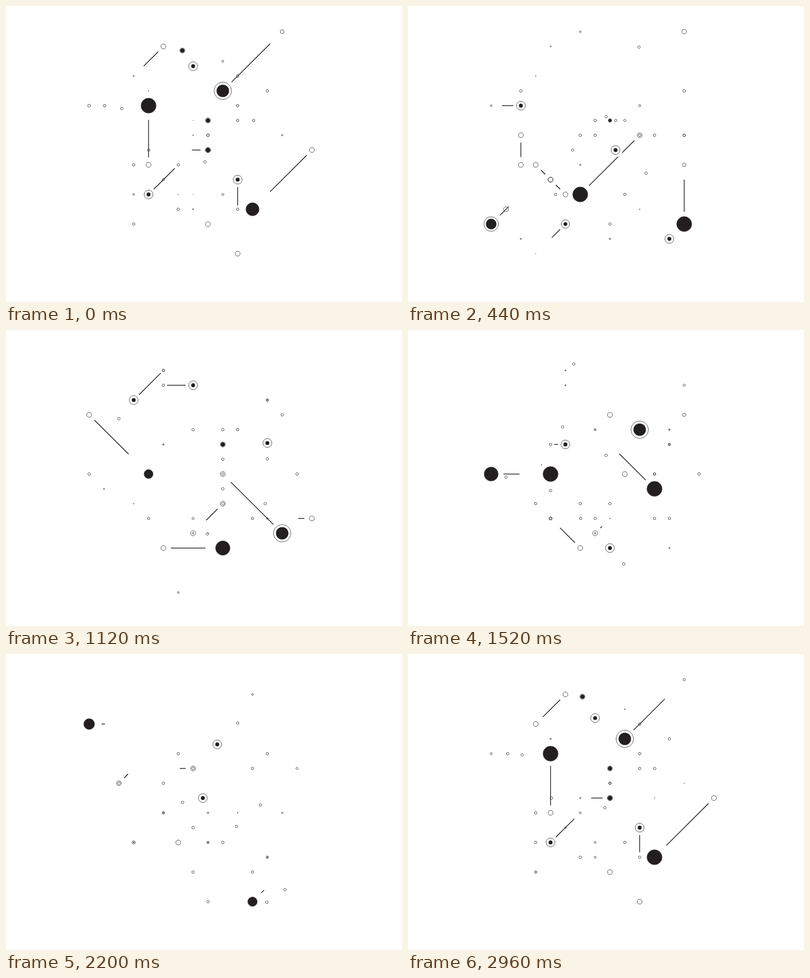
An HTML page with a canvas that plays this animation: 800x600 px, repeating every 3000 ms.

```html
<!DOCTYPE html>
<html lang="en">
<head>
<meta charset="utf-8">
<title>Grid constellation</title>
<style>
  html, body { margin: 0; width: 100%; height: 100%; overflow: hidden; background: #fff; }
  canvas { display: block; }
</style>
</head>
<body>
<canvas id="stage" width="800" height="600"></canvas>
<script>
const ctx = document.getElementById('stage').getContext('2d');
const LOOP = 3000, STEP = 40, COLS = 16, ROWS = 17, CELL = 30, INK = '#231f20';
const TRAVEL = 320, WALK = 400, DOTS = 128;
const RADIUS = { dot: 2.6, hoop: 5, spot: 5.6, eye: 9, disc: 15.6, target: 17.5 };
const GAP = { dot: 7.5, hoop: 15, eye: 15, disc: 25, target: 25 };

const clamp = v => Math.min(1, Math.max(0, v));
const ease = u => (1 - Math.cos(Math.PI * clamp(u))) / 2;
const wrap = (t, n) => ((t % n) + n) % n;
const since = (t, start) => wrap(t - start + 1000, LOOP) - 1000;
const px = col => 168 + CELL * col;
const py = row => 52 + CELL * row;

function random(seed) {
  return () => {
    seed = (seed * 1664525 + 1013904223) >>> 0;
    return seed / 4294967296;
  };
}

// A line leaves one node and arrives at another: start time, from, to
const links = [
  [18, 'hoop', 0, 5, 'eye', 2, 5],
  [120, 'disc', 6, 11, 'hoop', 10, 7],
  [130, 'hoop', 3, 9, 'hoop', 4, 10],
  [130, 'hoop', 4, 10, 'hoop', 5, 11],
  [152, 'hoop', 2, 7, 'hoop', 2, 9],
  [211, 'disc', 13, 13, 'hoop', 13, 9],
  [293, 'eye', 5, 13, 'hoop', 3, 15],
  [325, 'target', 0, 13, 'hoop', 3, 10],
  [624, 'hoop', 13, 11, 'hoop', 15, 11],
  [726, 'disc', 9, 13, 'hoop', 5, 13],
  [800, 'eye', 3, 3, 'dot', 5, 1],
  [800, 'eye', 7, 2, 'dot', 5, 2],
  [851, 'target', 13, 12, 'hoop', 9, 8],
  [906, 'hoop', 0, 4, 'disc', 4, 8],
  [941, 'hoop', 9, 10, 'hoop', 7, 12],
  [1200, 'eye', 5, 6, 'dot', 4, 6],
  [1299, 'hoop', 6, 13, 'hoop', 4, 11],
  [1343, 'disc', 11, 9, 'hoop', 7, 5],
  [1380, 'disc', 0, 8, 'hoop', 4, 8],
  [2060, 'hoop', 7, 6, 'hoop', 5, 6],
  [2104, 'hoop', 2, 7, 'hoop', 4, 5],
  [2122, 'disc', 0, 3, 'hoop', 3, 3],
  [2149, 'disc', 11, 15, 'hoop', 15, 11],
  [2218, 'eye', 3, 11, 'dot', 3, 13],
  [2245, 'eye', 12, 12, 'dot', 10, 10],
  [2330, 'target', 6, 11, 'hoop', 10, 15],
  [2536, 'hoop', 6, 8, 'hoop', 8, 8],
  [2574, 'hoop', 3, 3, 'hoop', 5, 1],
  [2587, 'disc', 11, 12, 'hoop', 15, 8],
  [2635, 'disc', 4, 5, 'hoop', 4, 9],
  [2696, 'eye', 10, 10, 'dot', 10, 12],
  [2722, 'eye', 4, 11, 'dot', 6, 9],
  [2761, 'target', 9, 4, 'hoop', 13, 0]
];

// Shapes that walk alone: start time, kind, node, step
const walkers = [
  [272, 'eye', 8, 8, 1, 0],
  [300, 'eye', 12, 14, 0, 0],
  [1040, 'eye', 12, 6, 0, -1],
  [1400, 'target', 10, 5, 0, 0],
  [1420, 'eye', 8, 13, 0, 0],
  [2032, 'eye', 9, 4, -1, 1],
  [2040, 'eye', 8, 8, -1, 0],
  [2707, 'eye', 7, 4, 0, -2]
];

// Small shapes come and go all over the grid, half of them taking one step
const rnd = random(11);
const pick = n => Math.floor(rnd() * n);
const middling = n => Math.floor((rnd() + rnd()) / 2 * n);
for (let i = 0; i < DOTS; i++) {
  const roll = rnd(), moves = rnd() < 0.5;
  walkers.push([
    i * LOOP / DOTS,
    roll < 0.1 ? 'hoop' : roll < 0.18 ? 'spot' : 'dot',
    middling(COLS), middling(ROWS),
    moves ? pick(3) - 1 : 0, moves ? pick(3) - 1 : 0
  ]);
}

function circle(x, y, r, color) {
  ctx.beginPath();
  ctx.arc(x, y, r, 0, 2 * Math.PI);
  if (color) {
    ctx.fillStyle = color;
    ctx.fill();
  } else {
    ctx.lineWidth = 0.8;
    ctx.stroke();
  }
}

const paint = {
  dot: circle,
  hoop: circle,
  spot(x, y, r) {
    circle(x, y, r * 0.76, INK);
    circle(x, y, r * 0.92);
  },
  eye(x, y, r) {
    circle(x, y, r * 1.6, '#fff');
    circle(x, y, r);
    circle(x, y, r * 0.44, INK);
  },
  disc(x, y, r) {
    circle(x, y, r * 0.96, INK);
    circle(x, y, r * 0.98);
  },
  target(x, y, r) {
    circle(x, y, r * 1.37, '#fff');
    circle(x, y, r);
    circle(x, y, r * 0.72, INK);
  }
};

let shapes;
function place(kind, x, y, scale) {
  const r = RADIUS[kind] * scale;
  if (r > 0.3) shapes.push({ kind, x, y, r });
}

// The head runs to the far node during q 0..1, the tail follows during q 1..2
function drawLink([start, from, c1, r1, to, c2, r2], t) {
  const q = since(t, start) / TRAVEL;
  const x1 = px(c1), y1 = py(r1), x2 = px(c2), y2 = py(r2);
  const length = Math.hypot(x2 - x1, y2 - y1);
  const shrink = from === 'hoop' ? (1.36 - q) / 0.12 : (1.9 - q) / 0.7;
  place(from, x1, y1, Math.min(clamp((q + 0.4) / 0.9 + (from === 'hoop' ? 0.2 : 0)), clamp(shrink)) * (q > -0.4));
  place(to, x2, y2, Math.min(clamp((q - 0.43) * 2.5), clamp((2.4 - q) / 0.3)));
  if (q <= 0 || q >= 2) return;

  const full = length - GAP[from] - GAP[to];
  const at = d => [x1 + (x2 - x1) * d / length, y1 + (y2 - y1) * d / length];
  ctx.lineWidth = 1.5;
  ctx.beginPath();
  ctx.moveTo(...at(GAP[from] + full * ease(q - 1)));
  ctx.lineTo(...at(GAP[from] + full * ease(q)));
  ctx.stroke();
}

function placeWalker([start, kind, col, row, dx, dy], t) {
  const dt = since(t, start), step = ease(dt / WALK);
  const scale = Math.min(clamp((dt + 180) / 120), clamp((500 - dt) / 120));
  place(kind, px(col + dx * step), py(row + dy * step), scale);
}

function draw(t) {
  ctx.fillStyle = '#fff';
  ctx.fillRect(0, 0, 800, 600);
  ctx.strokeStyle = INK;
  shapes = [];
  for (const link of links) drawLink(link, t);
  for (const walker of walkers) placeWalker(walker, t);
  // Large shapes cover what passes beneath them
  shapes.sort((a, b) => RADIUS[a.kind] - RADIUS[b.kind]);
  for (const { kind, x, y, r } of shapes) paint[kind](x, y, r);
}

const origin = performance.now();
function tick() {
  draw(Math.floor(wrap(performance.now() - origin, LOOP) / STEP) * STEP);
  requestAnimationFrame(tick);
}
tick();
</script>
</body>
</html>
```
